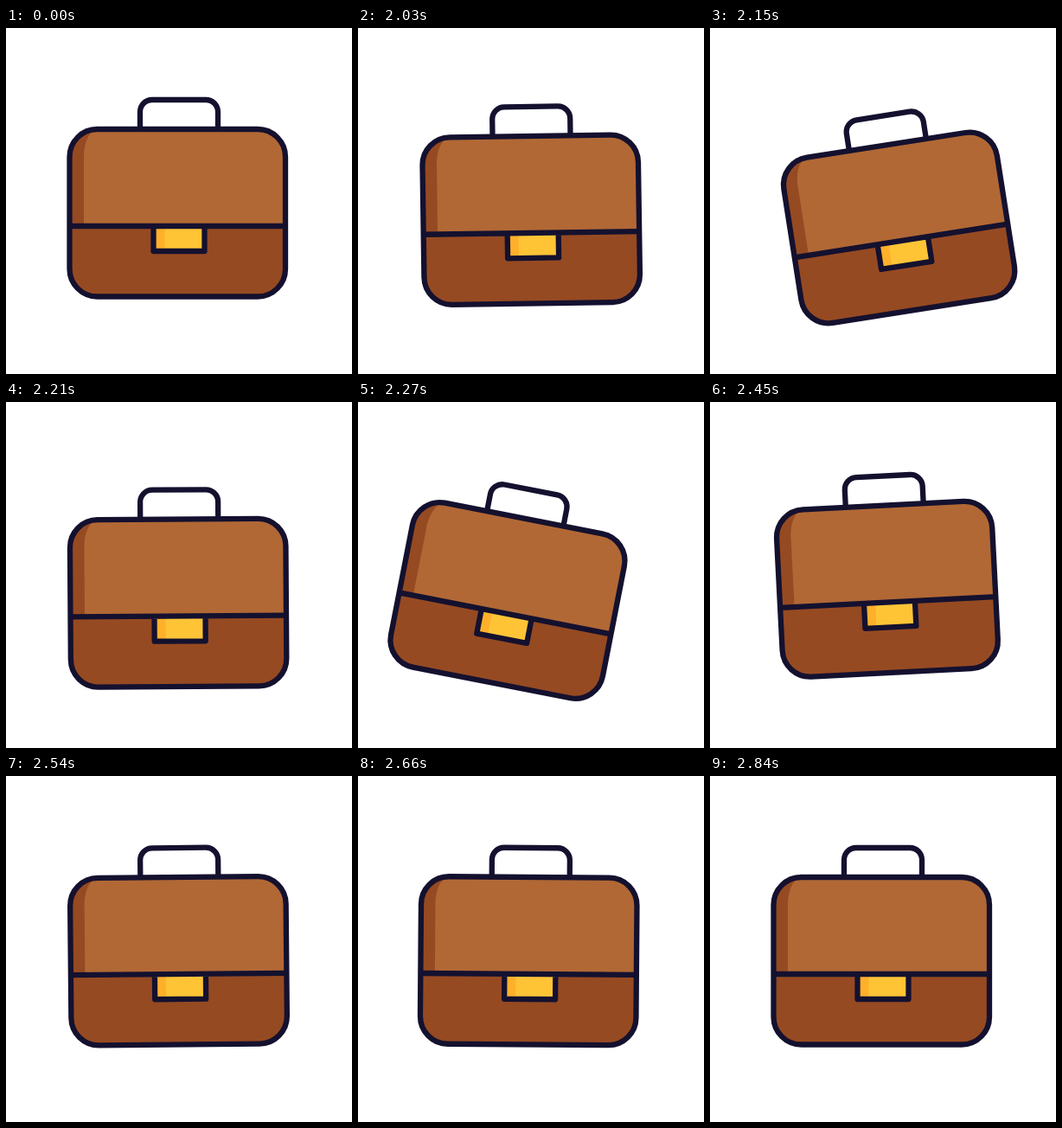
These frames come from a looping animation (400 by 400 pixels, 2.87 s). An HTML page:

```html
<!DOCTYPE html>
<html lang="en">
<head>
<meta charset="utf-8">
<title>Swinging briefcase</title>
<style>
  html, body { margin: 0; height: 100%; overflow: hidden; background: #fff; }
  svg { display: block; width: 100vw; height: 100vh; }
</style>
</head>
<body>
<svg viewBox="0 0 400 400">
  <g id="bag" stroke-linejoin="round">
    <path d="M73.5 229V149a32 32 0 0 1 32-32H291a32 32 0 0 1 32 32V229Z" fill="#964a22"/>
    <path d="M90 229V149C90 133 96 117 107 117H291a32 32 0 0 1 32 32V229Z" fill="#b16835"/>
    <path d="M73.5 229H323V278.5a32 32 0 0 1-32 32H105.5a32 32 0 0 1-32-32Z" fill="#964a22"/>
    <path d="M170.5 229H229.5V258H170.5Z" fill="#ffc436"/>
    <path d="M170.5 229H183.5V258H170.5Z" fill="#ffb02b"/>
    <g fill="none" stroke="#14112f" stroke-width="6.3">
      <path d="M155 117V97a14 14 0 0 1 14-14H231a14 14 0 0 1 14 14V117"/>
      <rect x="73.5" y="117" width="249.5" height="193.5" rx="32"/>
      <path d="M73.5 229H323M170.5 229V258H229.5V229"/>
    </g>
  </g>
</svg>
<script>
const LOOP = 2870, REST = 2030, STEP = 30;
const bag = document.getElementById('bag');

// Turning points of the swing: [ms, degrees]
const swing = [[2000, 0], [2150, -8.9], [2285, 11.7], [2474, -3.5], [2600, 2], [2720, -1.1], [2840, 0]];

const clamp = u => Math.min(1, Math.max(0, u));
const ease = u => (1 - Math.cos(Math.PI * clamp(u))) / 2;

function angle(t) {
  let value = 0;
  for (let i = 1; i < swing.length; i++) {
    const [t0, a0] = swing[i - 1], [t1, a1] = swing[i];
    value += (a1 - a0) * ease((t - t0) / (t1 - t0));
  }
  return value;
}

function drop(t) {
  const fall = 1 - (1 - clamp((t - 2000) / 150)) ** 2.5;
  return 18.5 * (fall - ease((t - 2325) / 165));
}

function draw(now) {
  const ms = now % LOOP;
  const t = ms < REST ? 0 : REST + Math.floor((ms - REST) / STEP) * STEP;
  bag.setAttribute('transform', `translate(0 ${drop(t)}) rotate(${angle(t)} 200 82)`);
}

const start = performance.now();
function tick() {
  draw(performance.now() - start);
  requestAnimationFrame(tick);
}
tick();
</script>
</body>
</html>
```
